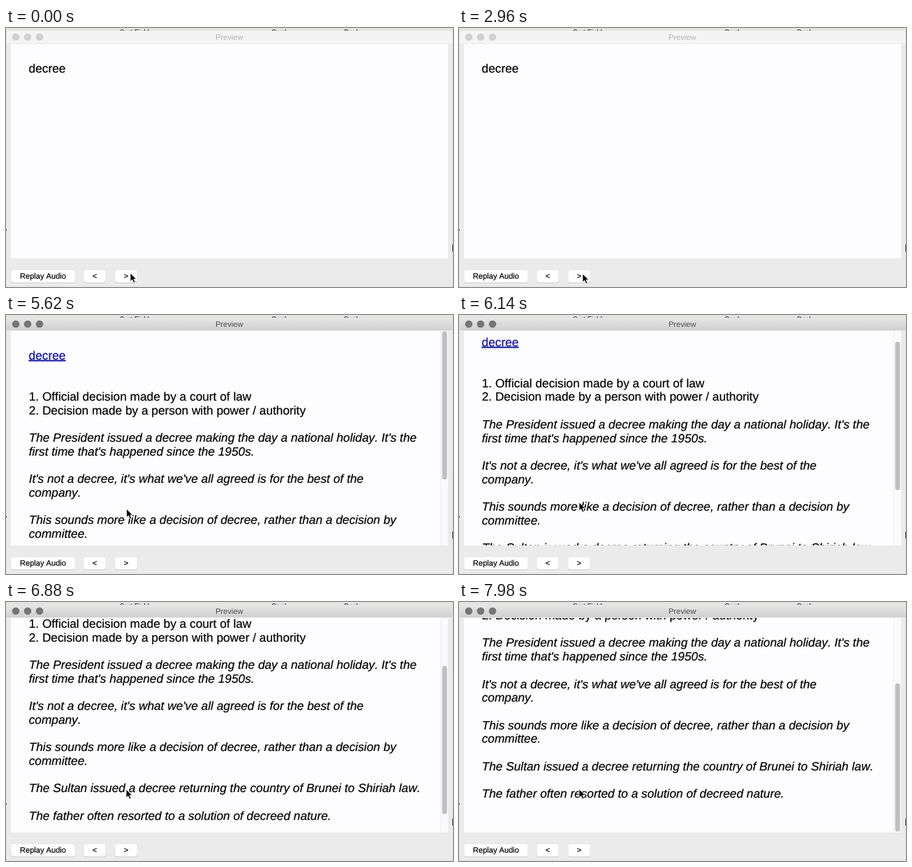
An HTML page for the animation above (8000 ms loop, 640 by 372 pixels).

```html
<!DOCTYPE html>
<html lang="en">
<head>
<meta charset="utf-8">
<title>Preview</title>
<style>
  html, body { margin: 0; width: 100%; height: 100%; overflow: hidden; background: #ebebeb; }
  svg { display: block; width: 640px; height: 372px; }
  text { font-family: "Liberation Sans", Arial, sans-serif; text-rendering: geometricPrecision; font-kerning: none; }
  .card text { font-size: 17.27px; stroke: #000; stroke-width: .2; }
  .card .example { font-style: italic; }
  .card .link { fill: #1010a0; stroke: #1010a0; text-decoration: underline; }
  .small { font-size: 11.1px; text-anchor: middle; }
  .behind { font-size: 9.8px; }
</style>
</head>
<body>
<svg viewBox="0 0 640 372">
  <defs>
    <linearGradient id="activeBar" x2="0" y2="1">
      <stop offset="0" stop-color="#e6e6e6"/>
      <stop offset="1" stop-color="#d0d0d0"/>
    </linearGradient>
    <clipPath id="pane"><rect x="7" y="23" width="626" height="308"/></clipPath>
  </defs>

  <rect width="640" height="372" fill="#e4e4e0"/>
  <g class="behind">
    <text x="163" y="9">Sort Field</text>
    <text x="380" y="9">Card</text>
    <text x="484" y="9">Deck</text>
  </g>
  <path d="M0 289h1v2H0zM639 311h1v10h-1z" fill="#333"/>

  <rect x="1" y="4" width="638" height="367" rx="4" fill="#ebebeb"/>
  <path id="bar" d="M1 22V8q0-4 4-4H635q4 0 4 4V22z"/>
  <g id="lights"></g>
  <text id="title" class="small" x="319.7" y="17">Preview</text>

  <rect x="7" y="23" width="626" height="308" fill="#fdfdff"/>
  <g class="card" clip-path="url(#pane)">
    <text id="front" x="32.6" y="63.7">decree</text>
    <g id="back">
      <g id="lines"><text class="link" x="32.6" y="63.7">decree</text></g>
      <rect x="622" y="23" width="11" height="308" fill="#fafafc"/>
      <path d="M622.5 23V331" stroke="#eeeef0"/>
      <rect id="thumb" x="624.5" y="23.3" width="7" height="213" rx="3.5" fill="#bfbfbf"/>
    </g>
  </g>

  <g id="buttons"></g>
  <path id="cursor" d="M0 0V12.2L2.8 9.6 4.9 14.2 7 13.3 5 8.8H8.7Z"
        fill="#000" stroke="#fff" stroke-width=".8"/>
</svg>
<script>
const DURATION = 8000, REVEAL = 3100, ROW = 19.72;
const $ = id => document.getElementById(id);

function add(parent, tag, attributes, text = '') {
  const node = document.createElementNS('http://www.w3.org/2000/svg', tag);
  for (const [key, value] of Object.entries(attributes)) node.setAttribute(key, value);
  node.textContent = text;
  parent.append(node);
}

// Row number below the headword, then the text.
const rows = [
  [3, '1. Official decision made by a court of law'],
  [4, '2. Decision made by a person with power / authority'],
  [6, "The President issued a decree making the day a national holiday. It's the"],
  [7, "first time that's happened since the 1950s."],
  [9, "It's not a decree, it's what we've all agreed is for the best of the"],
  [10, 'company.'],
  [12, 'This sounds more like a decision of decree, rather than a decision by'],
  [13, 'committee.'],
  [15, 'The Sultan issued a decree returning the country of Brunei to Shiriah law.'],
  [17, 'The father often resorted to a solution of decreed nature.']
];
for (const [row, text] of rows)
  add($('lines'), 'text', { x: 32.7, y: 63.7 + row * ROW, class: row > 4 ? 'example' : '' }, text);

for (const x of [14, 31, 48]) add($('lights'), 'circle', { cx: x, cy: 13, r: 5.3 });

for (const [x, width, label] of [[7, 92, 'Replay Audio'], [111, 32, '<'], [156, 32, '>']]) {
  add($('buttons'), 'rect', { x, y: 348.7, width, height: 17.8, rx: 3.5, fill: '#cbcbcb' });
  add($('buttons'), 'rect', { x: x + .3, y: 348, width: width - .6, height: 17.6, rx: 3.5, fill: '#fff' });
  add($('buttons'), 'text', { x: x + width / 2, y: 359.7, class: 'small', stroke: '#000', 'stroke-width': .2 }, label);
}

// Linear interpolation through [time, value] points.
function track(points, time) {
  const next = points.findIndex(point => point[0] > time);
  if (next < 0) return points[points.length - 1][1];
  if (next === 0) return points[0][1];
  const [t0, v0] = points[next - 1], [t1, v1] = points[next];
  return v0 + (v1 - v0) * (time - t0) / (t1 - t0);
}

const scrollPath = [[5920, 0], [6140, 19], [6460, 55], [6880, 86], [7180, 108], [7400, 117.6]];
const cursorX = [[1500, 178], [1700, 177], [5000, 177], [5700, 172]];
const cursorY = [[1500, 352], [1700, 353], [5000, 353], [5700, 269]];

function draw(time) {
  const revealed = time >= REVEAL;
  const scroll = track(scrollPath, time);
  $('front').style.display = revealed ? 'none' : '';
  $('back').style.display = revealed ? '' : 'none';
  $('bar').setAttribute('fill', revealed ? 'url(#activeBar)' : '#f4f4f4');
  $('lights').setAttribute('fill', revealed ? '#757575' : '#d0d0d0');
  $('title').setAttribute('fill', revealed ? '#4c4c4c' : '#b4b4b4');
  $('lines').setAttribute('transform', `translate(0 ${-scroll})`);
  $('thumb').setAttribute('transform', `translate(0 ${scroll * .795})`);
  $('cursor').setAttribute('transform', `translate(${track(cursorX, time)} ${track(cursorY, time)})`);
}

const start = performance.now();
function frame() {
  draw((performance.now() - start) % DURATION);
  requestAnimationFrame(frame);
}
frame();
</script>
</body>
</html>
```
